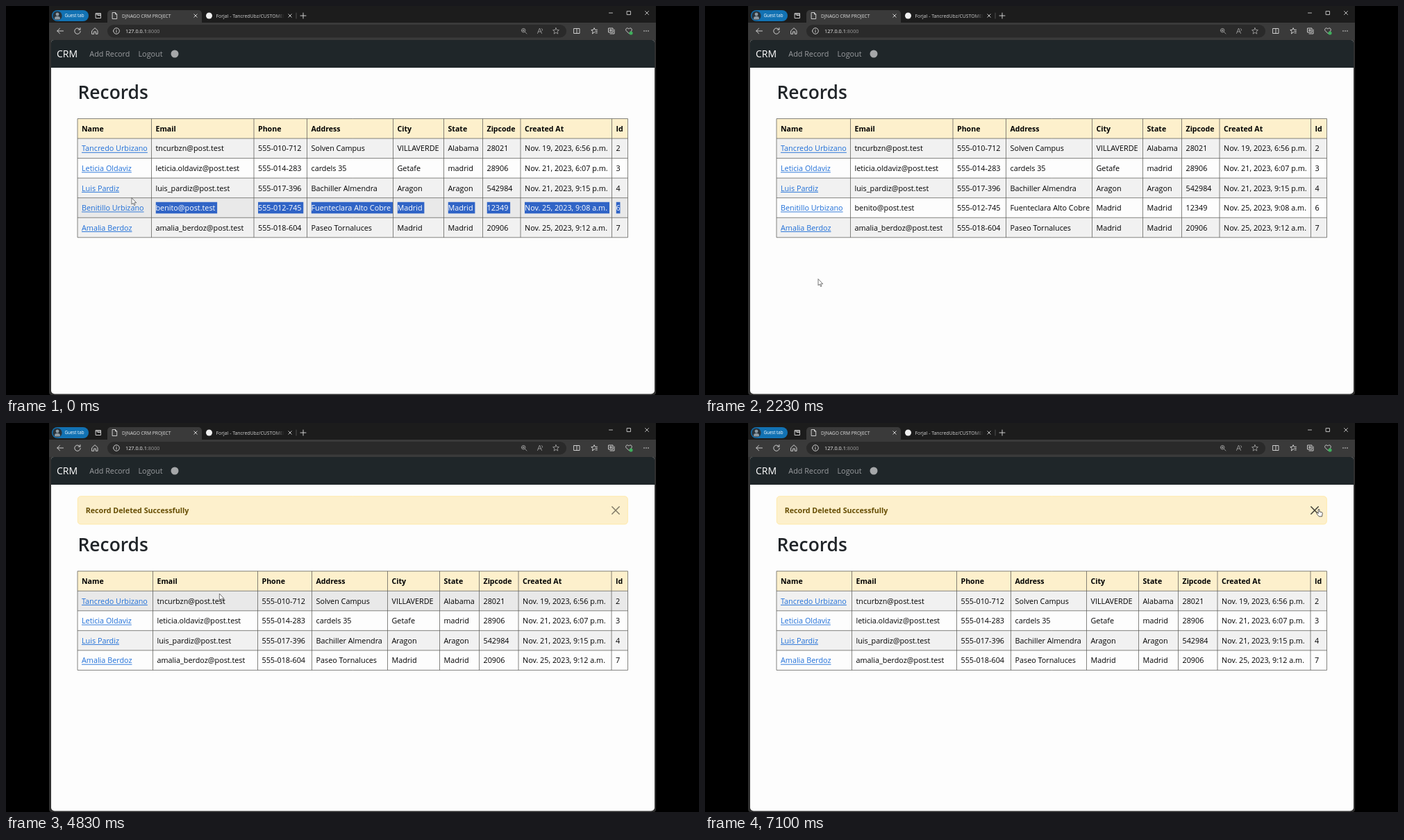
Animation, 998 px wide and 561 px high, one loop 7.13 s. Source, as an HTML page with a canvas:

```html
<!DOCTYPE html>
<html lang="en">
<head>
<meta charset="utf-8">
<title>CRM demo</title>
<style>
html, body { margin: 0; width: 100%; height: 100%; overflow: hidden; background: #000; }
canvas { display: block; }
</style>
</head>
<body>
<canvas id="stage" width="998" height="561"></canvas>
<script>
const c = document.getElementById('stage').getContext('2d');
const LOOP = 7130;
const BLUE = '#3064c6', INK = '#212529', PAGE = '#fdfdfd', CREAM = '#fdf0cc';

// Moments at which the page changes
const DESELECT = 1900, OPEN = 2900, OPENED = 3100, DELETE = 4520, DELETED = 4700, DRAG = 5170, CLEAR = 6150;

const HEAD = ['Name', 'Email', 'Phone', 'Address', 'City', 'State', 'Zipcode', 'Created At', 'Id'];
const ROWS = [
  'Tancredo Urbizano|tncurbzn@post.test|555-010-712|Solven Campus|VILLAVERDE|Alabama|28021|Nov. 19, 2023, 6:56 p.m.|2',
  'Leticia Oldaviz|leticia.oldaviz@post.test|555-014-283|cardels 35|Getafe|madrid|28906|Nov. 21, 2023, 6:07 p.m.|3',
  'Luis Pardiz|luis_pardiz@post.test|555-017-396|Bachiller Almendra|Aragon|Aragon|542984|Nov. 21, 2023, 9:15 p.m.|4',
  'Benitillo Urbizano|benito@post.test|555-012-745|Fuenteclara Alto Cobre|Madrid|Madrid|12349|Nov. 25, 2023, 9:08 a.m.|6',
  'Amalia Berdoz|amalia_berdoz@post.test|555-018-604|Paseo Tornaluces|Madrid|Madrid|20906|Nov. 25, 2023, 9:12 a.m.|7'
].map(r => r.split('|'));
const PICKED = ROWS[3];
const COLS_FULL = [103, 209.5, 357, 433.5, 557.5, 630.5, 686.5, 741, 872.5, 895.5];
const COLS_LESS = [103, 211.5, 362.5, 440.5, 549.5, 624.5, 681.5, 738, 872, 895.5];
const PITCH = 28.55;

// Pointer path: time, x, y, shape used from that time on
const PATH = [
  [0, 181, 277, 'arrow'], [450, 106, 285, 'arrow'], [650, 104, 292, 'arrow'],
  [1130, 122, 339, 'arrow'], [1670, 122, 339, 'arrow'], [2200, 163, 394, 'arrow'],
  [2300, 163, 394, 'arrow'], [2640, 155, 300, 'hand'], [2800, 154, 291, 'hand'],
  [OPEN, 154, 291, 'arrow'], [3050, 154, 291, 'arrow'], [3720, 366, 430, 'hand'],
  [3900, 374, 437, 'hand'], [DELETE, 374, 437, 'arrow'], [5050, 268, 134, 'beam'],
  [DRAG, 266, 133, 'beam'], [5430, 223, 133, 'beam'], [5800, 116, 131, 'beam'],
  [6200, 116, 131, 'beam'], [6350, 280, 131, 'arrow'], [6800, 870, 125, 'hand'],
  [6900, 884, 124, 'hand'], [LOOP, 884, 124, 'hand']
];

function pointer(t) {
  const i = PATH.findIndex((p, k) => k && t < p[0]);
  const [t0, x0, y0, shape] = PATH[i - 1], [t1, x1, y1] = PATH[i];
  const u = (t - t0) / (t1 - t0), e = u * u * (3 - 2 * u);
  return { x: x0 + (x1 - x0) * e, y: y0 + (y1 - y0) * e, shape };
}

function font(size = 10.8, weight = 400) {
  c.font = `${weight} ${size}px "Open Sans", "Noto Sans", sans-serif`;
}
function text(s, x, y, color = '#000', size, weight) {
  font(size, weight);
  c.fillStyle = color;
  c.fillText(s, x, y);
  return c.measureText(s).width;
}
function heading(s, x, y) {
  text(s, x, y, INK, 26.4, 600);
}
function box(x, y, w, h, fill, r = 0, line) {
  c.beginPath();
  c.roundRect(x, y, w, h, r);
  c.fillStyle = fill;
  c.fill();
  if (line) { c.strokeStyle = line; c.lineWidth = 0.8; c.stroke(); }
}
function dot(x, y, r, fill) {
  c.beginPath();
  c.arc(x, y, r, 0, 7);
  c.fillStyle = fill;
  c.fill();
}
function path(x, y, d, line, width = 0.9, fill) {
  const p = new Path2D(d);
  c.save();
  c.translate(x, y);
  c.lineJoin = c.lineCap = 'round';
  if (fill) { c.fillStyle = fill; c.fill(p); }
  c.strokeStyle = line;
  c.lineWidth = width;
  c.stroke(p);
  c.restore();
}
function cross(x, y, r, color, width) {
  path(x, y, `M${-r} ${-r}L${r} ${r}M${r} ${-r}L${-r} ${r}`, color, width);
}
// Runs draw in white over a selection bar
function highlight(left, right, y, draw) {
  c.save();
  c.beginPath();
  c.rect(left, y - 12.5, right - left, 17);
  c.clip();
  c.fillStyle = BLUE;
  c.fill();
  draw('#fff');
  c.restore();
}
// Left edge of the first whole letter at or after x
function snap(s, left, x, size, weight) {
  font(size, weight);
  for (let i = 0; i < s.length; i++) {
    const edge = left + c.measureText(s.slice(0, i)).width;
    if (edge >= x) return edge;
  }
  return Infinity;
}

function tabs(t, loading, address) {
  box(66, 6, 53, 16, '#1272b3', 8);
  dot(74, 14, 6.6, '#28323a');
  dot(74, 12, 2.4, '#8d9aa3');
  box(70, 15, 8, 4.5, '#8d9aa3', [4, 4, 2, 2]);
  text('Guest tab', 84.5, 16.3, '#fff', 6.2);
  path(133, 14, 'M-3.5-3.5H3.5V3.5H-3.5ZM-3.5-2H3.5M-1-2V-.5H3.5', '#ddd');

  box(146, 6, 136, 19, '#3a3a3a', [5, 5, 0, 0]);
  if (loading) {
    const a = t / 120;
    dot(156 + 3 * Math.cos(a), 14 + 3 * Math.sin(a), 0.8, '#aaa');
  } else {
    path(156.5, 14, 'M-3-4.5H1L3.2-2V4.5H-3ZM1-4.5V-2H3.2', '#ddd');
  }
  text(loading ? '127.0.0.1:8000' + address : 'DJNAGO CRM PROJECT', 167, 16.6, '#ddd', 6.7);
  cross(273, 14, 2.2, '#ddd');

  dot(292.5, 14, 4.5, '#f0f0f0');
  const fade = c.createLinearGradient(388, 0, 401, 0);
  fade.addColorStop(0, '#d0d0d0');
  fade.addColorStop(1, '#d0d0d000');
  text('Forjal - TancredUbz/CUSTOMER', 302.5, 16.6, fade, 6.9);
  cross(409, 14, 2.2, '#ddd');
  path(418, 14, 'M0-4V4', '#555');
  path(428, 14, 'M-4 0H4M0-4V4', '#ddd');
  path(871, 10, 'M-2.5 0H2.5', '#ccc');
  path(897, 10, 'M-2.5-2.5H2.5V2.5H-2.5Z', '#ccc');
  cross(923, 10, 2.5, '#ccc');
}

function toolbar(loading, address) {
  path(78, 36, 'M4.5 0H-4M-.5-3.7L-4.3 0L-.5 3.7', '#ddd');
  if (loading) cross(103, 36, 3.5, '#ddd');
  else path(103, 36, 'M3.6-2A4.2 4.2 0 1 0 4.2 .4M3.9-4.5V-1.8H1.2', '#ddd');
  path(128, 36, 'M-4-.5L0-4.3L4-.5V4.3H1.3V1H-1.3V4.3H-4Z', '#ddd');

  box(146, 27, 661, 18.5, '#2a2a2a', 9);
  path(159, 36, 'M-4.3 0A4.3 4.3 0 1 0 4.3 0A4.3 4.3 0 1 0-4.3 0M0-.6V2M0-2.2V-2', '#ddd');
  const w = text('127.0.0.1', 172, 39, '#eee', 7.3);
  text(':8000' + address, 172 + w, 39, '#999', 7.3);

  path(746, 36, 'M1.5 1.5L4 4M-3.6-.8A2.8 2.8 0 1 0 2-.8A2.8 2.8 0 1 0-3.6-.8M-2.2-.8H.6M-.8-2.2V.6', '#aaa', 0.8);
  path(769, 36, 'M-3.5 3.5L-.5-4L2.5 3.5M-2.4 1H1.4M2.5-3.5Q4-2.5 3.5-.8', '#aaa', 0.8);
  path(792, 36, 'M0-4.4L1.3-1.5L4.4-1.3L2 .9L2.8 4.1L0 2.3L-2.8 4.1L-2 .9L-4.4-1.3L-1.3-1.5Z', '#aaa', 0.8);
  path(822, 36, 'M-4-3.5H4V3.5H-4ZM0-3.5V3.5', '#ddd');
  path(847, 36, 'M.8 1.5L-2.6 4L-1.8 .7L-4.2-1.4L-1.1-1.7L.1-4.4L1.3-1.7H4.4M2 .5H4.4M2 2.8H4.4', '#ddd');
  path(872, 36, 'M-4-4H2V2H-4ZM-2 4H4V-2M-1-2.7V.7M-2.7-1H.7', '#ddd');
  path(897, 35.5, 'M0 4L-4 0C-5.5-3-2-5 0-2.3C2-5 5.5-3 4 0Z', '#ddd');
  dot(900, 39, 2.6, '#3fae5c');
  for (const x of [919, 922, 925]) dot(x, 36, 0.8, '#ddd');
}

function chrome(t, loading, address) {
  box(62, 0, 874, 561, '#303030', 4);
  box(62, 0, 874, 25, '#1c1c1c');
  box(62, 24, 874, 25, '#3a3a3a');
  tabs(t, loading, address);
  toolbar(loading, address);

  box(65, 49, 869, 510.5, PAGE, [4, 4, 5, 5]);
  box(65, 49, 869, 40, '#1f2629', [4, 4, 0, 0]);
  text('CRM', 73, 74.3, '#fff', 14);
  text('Add Record', 120.3, 73.3, '#9b9da0');
  text('Logout', 190.5, 73.3, '#9b9da0');
  if (!loading) dot(243, 69, 5.5, '#a5a7a9');
}

function link(s, x, y, color) {
  const w = text(s, x, y, color);
  c.fillRect(x, y + 1.4, w, 0.9);
}

// Cells of the picked row are selected; its name only from selectFrom on
function table(top, cols, rows, p, selectFrom) {
  const right = cols[9], bottom = top + PITCH * (rows.length + 1);
  box(103, top, right - 103, PITCH, CREAM);
  HEAD.forEach((s, i) => text(s, cols[i] + 6, top + 18.4, '#000', 10.6, 700));
  rows.forEach((row, r) => {
    const y = top + PITCH * (r + 1), base = y + 18.4;
    const hover = p.y >= y && p.y < y + PITCH && p.x > 103 && p.x < right;
    if (hover || r % 2 === 0) box(103, y, right - 103, PITCH, hover ? '#e9e9e9' : '#f1f1f1');
    row.forEach((s, i) => {
      const x = cols[i] + 6;
      const draw = color => i ? text(s, x, base, color) : link(s, x, base, color);
      draw(i ? '#000' : hover && p.shape === 'hand' ? '#0a58ca' : '#1f6fd8');
      if (row !== PICKED || selectFrom === null) return;
      const from = i ? x : snap(s, x, selectFrom);
      font();
      const end = x + c.measureText(s).width + (i < 8 ? 3 : 0);
      if (from < end) highlight(from, end, base, draw);
    });
  });
  c.beginPath();
  for (const x of cols) { c.moveTo(x, top); c.lineTo(x, bottom); }
  for (let r = 0; r <= rows.length + 1; r++) {
    c.moveTo(103, top + r * PITCH);
    c.lineTo(right, top + r * PITCH);
  }
  c.strokeStyle = '#5c5c58';
  c.lineWidth = 0.75;
  c.stroke();
}

function records(t, p) {
  heading('Records', 103.5, 133.5);
  // The bar trails the dragging pointer a little
  const from = t > 450 ? 0 : p.x + 18;
  table(162.5, COLS_FULL, ROWS, p, t < DESELECT ? from : null);
}

function customer(p) {
  heading('Customer Record', 301, 133.5);
  box(301.4, 162.5, 395.8, 248.5, PAGE, 4.5, '#d6d6d6');
  box(301.4, 162.5, 395.8, 28.5, '#f4f4f4', [4.5, 4.5, 0, 0], '#d6d6d6');
  text(PICKED[0], 313, 182, INK, 13.3, 600);
  [['Name', 0], ['Email', 1], ['Phone', 2], ['Address', 3], ['Zipcode', 6], ['Created At', 7], ['ID', 8]]
    .forEach(([label, k], i) => {
      const y = 215 + i * 28.2;
      const w = text(label + ':', 313, y, INK, 10.6, 700);
      text(PICKED[k], 313 + w + 2.8, y, INK);
    });
  const onDelete = p.shape === 'hand' && p.y > 428;
  [['Update', 301, 54.5, '#219653'], ['Delete', 359, 50, onDelete ? '#b01c3a' : '#d02146'], ['Return', 412, 51, '#6c757d']]
    .forEach(([s, x, w, fill]) => {
      box(x, 428.3, w, 26.4, fill, 4.3);
      text(s, x + 8.8, 445.4, '#fff');
    });
}

function afterDelete(t, p) {
  const message = 'Record Deleted Successfully', x = 114.7, y = 130;
  box(103.3, 105.7, 792, 40.3, CREAM, 4.3, '#ffe69c');
  const draw = color => text(message, x, y, color, 10.7, 700);
  const end = x + draw('#664d03');
  if (t > DRAG && t < CLEAR) {
    const from = snap(message, x, p.x < 122 ? 0 : p.x + 4, 10.7, 700);
    if (from < end) highlight(from, end, y, draw);
  }
  cross(878, 126, 5.2, p.shape === 'hand' ? '#3f3d34' : '#807a67', 1.5);
  heading('Records', 103.5, 185);
  table(213.7, COLS_LESS, ROWS.filter(r => r !== PICKED), p, null);
}

function drawPointer({ x, y, shape }) {
  if (shape === 'arrow') {
    path(x, y, 'M0 0V9L2 7.2L3.6 10.6L5 10L3.5 6.8H6.3Z', '#555', 0.8, '#fff');
  } else if (shape === 'hand') {
    path(x, y, 'M-.9 6V.8Q0-.6 .9 .8V4L4 4.6Q5.4 5 5.2 6.4L4.5 10.8H.2L-3 7Q-3.5 6-2.8 5.6Q-2.2 5-.9 6Z', '#333', 0.8, '#fff');
  } else {
    path(x, y, 'M-2-5Q0-5 0-4Q0-5 2-5M0-4V4M-2 5Q0 5 0 4Q0 5 2 5', '#333');
  }
}

function frame(now) {
  const t = now % LOOP, p = pointer(t);
  const onRecord = t >= OPEN && t < DELETE;
  const loading = t >= OPEN && t < OPENED || t >= DELETE && t < DELETED;
  c.clearRect(0, 0, 998, 561);
  chrome(t, loading, onRecord ? '/record/6' : '');
  if (t < OPEN) records(t, p);
  else if (onRecord) customer(p);
  else afterDelete(t, p);
  drawPointer(p);
}

const start = performance.now();
function tick() {
  frame(performance.now() - start);
  requestAnimationFrame(tick);
}
tick();
</script>
</body>
</html>
```
